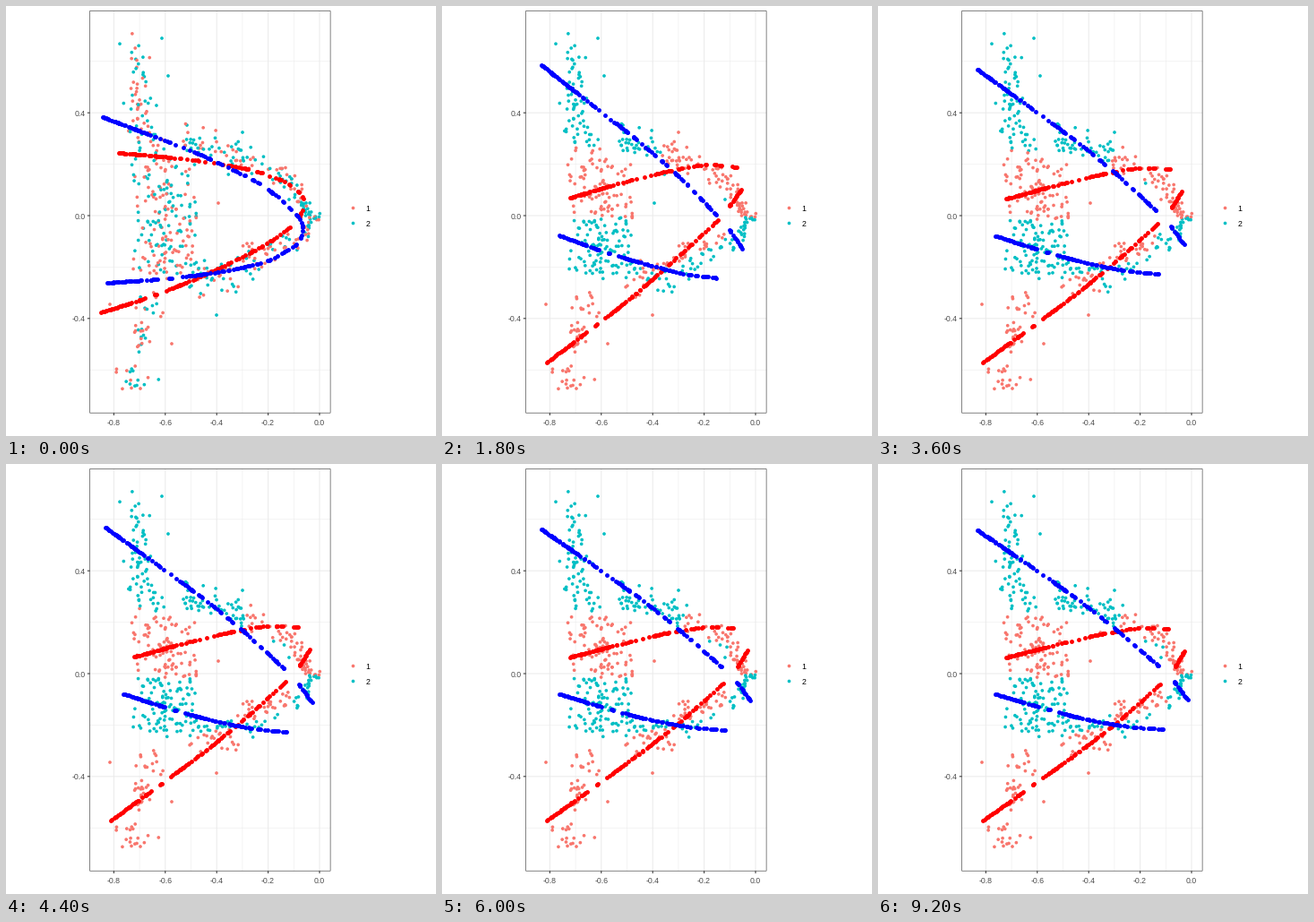
Animation, 480 px wide and 480 px high, one loop 10 s. Source, as a matplotlib script:

```python
import numpy as np
import matplotlib.pyplot as plt
from matplotlib.animation import FuncAnimation
from matplotlib.patches import Rectangle

SIZE = 480
PT = 0.72  # points per pixel at 100 dpi
SALMON, TEAL, GRID, INK = "#F8766D", "#00BFC4", "#EBEBEB", "#333333"
STEP_MS = 100
FITS = 6
SETTLE = 0.4  # share of the remaining correction left after each refit


# --- smooth paths, all in pixel coordinates ---
def along(keys, u):
    """Cubic Hermite curve through the key points, u in 0..1 by length."""
    keys = np.array(keys, float)
    s = np.r_[0, np.cumsum(np.hypot(*np.diff(keys, axis=0).T))]
    s /= s[-1]
    slope = np.gradient(keys, s, axis=0)
    i = np.clip(np.searchsorted(s, u, side="right") - 1, 0, len(s) - 2)
    h = (s[i + 1] - s[i])[:, None]
    t = (u - s[i])[:, None] / h
    ease = t * t * (3 - 2 * t)
    return (keys[i] * (1 - ease) + keys[i + 1] * ease
            + h * t * (1 - t) * ((1 - t) * slope[i] - t * slope[i + 1]))


def spaced(n, seed):
    """Uneven positions with occasional gaps, sparser toward the end."""
    gaps = np.random.default_rng(seed).lognormal(0, 0.9, n - 1) * np.linspace(1, 2.2, n - 1)
    return np.r_[0, np.cumsum(gaps)] / gaps.sum()


# --- scattered data ---
rng = np.random.default_rng(12)


def cloud(n, keys, sx, sy):
    noise = np.clip(rng.normal(size=(n, 2)), -1.9, 1.9)
    return along(keys, rng.uniform(size=n)) + noise * (sx, sy)


strays = [(174, 36), (181, 78), (116, 333), (185, 377), (235, 345), (237, 220),
          (202, 133), (264, 141)]
points = np.vstack([
    strays,
    cloud(23, [(143, 28), (148, 90)], 9, 3),
    cloud(50, [(147, 95), (152, 130), (164, 160)], 10, 4),
    cloud(195, [(172, 173), (180, 235), (172, 300)], 17, 4),
    cloud(60, [(198, 154), (235, 158), (270, 176)], 6, 12),
    cloud(36, [(270, 170), (310, 190), (330, 215)], 6, 8),
    cloud(26, [(325, 212), (336, 232), (349, 235)], 3, 4),
    cloud(22, [(349, 235), (333, 254)], 3, 4),
    cloud(32, [(325, 256), (300, 270), (275, 285)], 5, 9),
    cloud(66, [(285, 285), (245, 298), (205, 302)], 6, 13),
    cloud(14, [(155, 320), (160, 345)], 9, 3),
    cloud(20, [(147, 357), (153, 380)], 6, 5),
    cloud(19, [(142, 398), (150, 428)], 12, 4),
])


# --- fitted curves: each is a set of arms with a dot count ---
RED_COUNTS, BLUE_COUNTS = (85, 95, 16), (105, 85, 16)

RED_FIRST = [
    [(126, 164), (178, 168.5), (240, 176.5), (290, 188), (325, 206), (333, 217), (328, 235)],
    [(106, 342), (150, 328), (210, 305), (245, 289), (299, 260), (317, 247)]]
BLUE_FIRST = [
    [(108, 124), (160, 143.5), (235, 174), (285, 200), (315, 224), (331, 245), (329, 259)],
    [(113, 309), (190, 303), (250, 294.5), (295, 283), (324, 266)]]

RED_REFIT = [
    [(143, 214), (205, 196), (254, 184), (300, 177), (329, 180)],
    [(117, 398), (160, 365), (209, 327), (254, 288), (308, 239)],
    [(321, 223), (334, 205)]]
RED_FINAL = [
    [(143, 216), (210, 199), (254, 189), (300, 183), (324, 184)],
    [(117, 398), (165, 364), (211, 331), (260, 294), (315, 246)],
    [(332, 226), (342, 209)]]
BLUE_REFIT = [
    [(111, 66), (176, 117), (223, 154), (268, 194), (306, 233)],
    [(131, 256), (180, 274), (235, 290), (270, 299), (306, 303.5)],
    [(321, 250), (335, 271)]]
BLUE_FINAL = [
    [(111, 74), (180, 121), (232, 158), (272, 190), (313, 225)],
    [(131, 257), (180, 271), (229, 284), (282, 293), (318, 296)],
    [(331, 243), (346, 263)]]


def fits(first, refit, final):
    """The first curve, then refits that settle toward the final one."""
    yield first
    for k in range(FITS - 1):
        rest = SETTLE ** k
        yield [np.array(a) * rest + np.array(b) * (1 - rest) for a, b in zip(refit, final)]


def dots(arms, counts):
    return np.vstack([along(arm, spaced(n, seed))
                      for seed, (arm, n) in enumerate(zip(arms, counts))])


def distance(arms):
    trace = np.vstack([along(arm, np.linspace(0, 1, 100)) for arm in arms])
    return np.hypot(*(points[:, None] - trace).transpose(2, 0, 1)).min(axis=1)


red_fits = list(fits(RED_FIRST, RED_REFIT, RED_FINAL))
blue_fits = list(fits(BLUE_FIRST, BLUE_REFIT, BLUE_FINAL))
reds = [dots(arms, RED_COUNTS) for arms in red_fits]
blues = [dots(arms, BLUE_COUNTS) for arms in blue_fits]

# Classes start random, then follow the nearest curve.
classes = [rng.random(len(points)) < 0.5]
classes += [distance(b) < distance(r) for r, b in zip(red_fits, blue_fits)]


# --- stage ---
fig = plt.figure(figsize=(4.8, 4.8), dpi=100, facecolor="white")
ax = fig.add_axes([0, 0, 1, 1])
ax.set(xlim=(0, SIZE), ylim=(SIZE, 0))
ax.axis("off")

LEFT, RIGHT, TOP, BOTTOM = 93.6, 362.1, 5.5, 454.2
UNIT = 287


def px(value):
    return 350 + UNIT * value


def py(value):
    return 234 - UNIT * value


def line(x, y, color, width):
    ax.plot(x, y, color=color, lw=width * PT, zorder=0, solid_capstyle="butt", snap=False)


def label(x, y, text, color, ha):
    ax.text(x, y, text, color=color, ha=ha, va="center_baseline",
            family="Liberation Sans", fontsize=8.8 * PT)


def scatter(xy, color, diameter, z):
    return ax.scatter(*np.transpose(xy), s=(diameter * PT) ** 2, c=color,
                      linewidths=0, zorder=z)


for v in np.arange(-0.7, 0, 0.2):
    line([px(v)] * 2, [TOP, BOTTOM], GRID, 0.53)
for v in np.arange(-0.6, 0.7, 0.4):
    line([LEFT, RIGHT], [py(v)] * 2, GRID, 0.53)
for v in (-0.8, -0.6, -0.4, -0.2, 0.0):
    line([px(v)] * 2, [TOP, BOTTOM], GRID, 1.07)
    line([px(v)] * 2, [BOTTOM, BOTTOM + 2.75], INK, 1.07)
    label(px(v), 464.2, f"{v:.1f}", "#4D4D4D", "center")
for v in (-0.4, 0.0, 0.4):
    line([LEFT, RIGHT], [py(v)] * 2, GRID, 1.07)
    line([LEFT - 2.75, LEFT], [py(v)] * 2, INK, 1.07)
    label(88.7, py(v), f"{v:.1f}", "#4D4D4D", "right")
ax.add_patch(Rectangle((LEFT, TOP), RIGHT - LEFT, BOTTOM - TOP, fill=False,
                       ec=INK, lw=0.6 * PT, zorder=6, snap=False))

for y, text, color in ((225, "1", SALMON), (242.3, "2", TEAL)):
    scatter([(387, y)], color, 3.7, 3)
    label(401.4, y + 0.6, text, "black", "left")

data = scatter(points, [SALMON] * len(points), 3.7, 3)
red_dots = scatter(reds[0], "#FF0000", 4.9, 4)
blue_dots = scatter(blues[0], "#0000FF", 4.9, 5)
palette = np.array([SALMON, TEAL])


def update(frame):
    # Four steps of 900 ms, then steps of 800 ms; classes and fits alternate.
    ms = frame * STEP_MS
    step = ms // 900 if ms < 3600 else 4 + (ms - 3600) // 800
    data.set_facecolor(palette[classes[(step + 1) // 2].astype(int)])
    red_dots.set_offsets(reds[step // 2])
    blue_dots.set_offsets(blues[step // 2])
    return data, red_dots, blue_dots


anim = FuncAnimation(fig, update, frames=100, interval=STEP_MS, repeat=True, repeat_delay=0)
plt.show()
```
